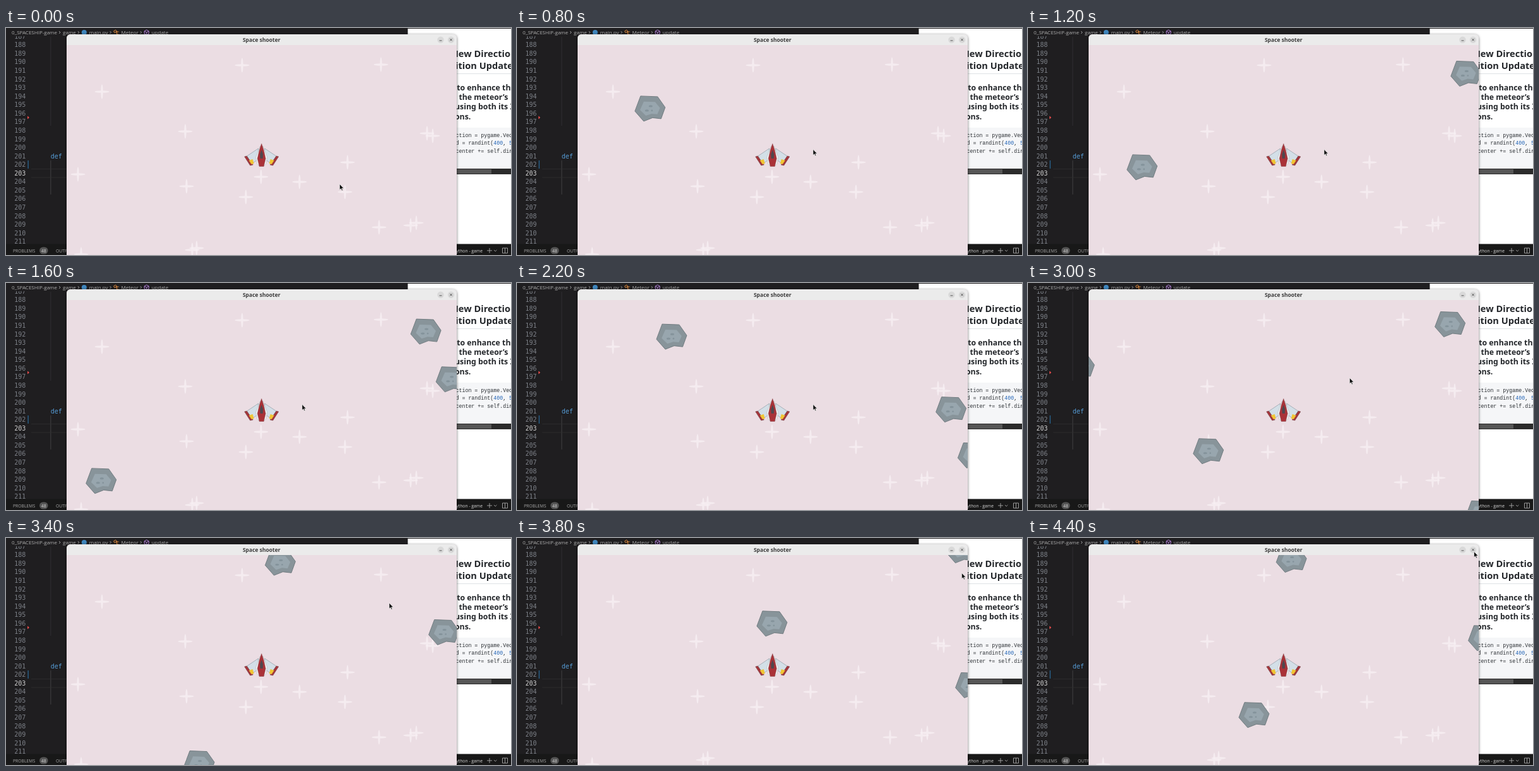
Write an HTML page that moves like this. It is 800 px wide and 360 px high and loops after 4600 ms.

```html
<!DOCTYPE html>
<html lang="en">
<head>
<meta charset="utf-8">
<title>Space shooter</title>
<style>
html, body { margin: 0; width: 100%; height: 100%; overflow: hidden; background: #1f1e20; }
svg { display: block; width: 800px; height: 360px; }
text { white-space: pre; }
.mono { font: 10px "DejaVu Sans Mono", monospace; fill: #7d8188; }
.active { fill: #d0d0d0; }
.keyword { fill: #569cd6; }
.crumb { font: 8px "Open Sans", sans-serif; fill: #adadad; }
.panel { font: 6.8px "Open Sans", sans-serif; fill: #a8a8a8; }
.light { fill: #d6d6d6; }
.heading { font: bold 14.6px "Noto Sans", sans-serif; fill: #25282c; }
.para { font: bold 12.3px "Noto Sans", sans-serif; fill: #25282c; }
.code { font: 8.3px "Liberation Mono", monospace; fill: #2b2f33; }
.number { fill: #1f62b5; }
.title { font: bold 8.5px "Noto Sans", sans-serif; fill: #3c3c3c; text-anchor: middle; }
.line { fill: none; stroke: #aaa; stroke-width: .9; }
.window { fill: #ebdde3; filter: drop-shadow(0 1px 2px rgba(0, 0, 0, .55)); }
</style>
</head>
<body>
<svg viewBox="0 0 800 360">
  <defs>
    <clipPath id="view"><rect x="96" y="27" width="618" height="333"/></clipPath>
    <g id="star" fill="#f8f0f4" opacity=".8">
      <ellipse rx="11.500" ry="1.700"/><ellipse rx="1.700" ry="11.500"/>
    </g>
    <path id="rock" d="M-15-20L12-19 24-2 17.500 16 4 14.500-10 20-24 4Z"/>
    <g id="meteor">
      <use href="#rock" fill="#88949a" stroke="#6b767b" stroke-width=".9"/>
      <use href="#rock" fill="#98a6ae" transform="scale(.66 .56)"/>
      <g fill="#84939b">
        <ellipse cx="-5" cy="3" rx="3" ry="1.600"/><ellipse cx="1" cy="-4" rx="3" ry="1.600"/><circle cx="3" cy="3" r="1.300"/>
      </g>
    </g>
    <g id="wing">
      <path d="M-5-11L-23 1-16 14-8 8-4 12Z" fill="#d3dfe7" stroke="#929da5" stroke-width=".7"/>
      <path d="M-27 2L-23.500 1-13.500 15-18 16Z" fill="#a5343a" stroke="#6f4548" stroke-width=".6"/>
      <path d="M-20 8L-14 6-12 13-16 14Z" fill="#f0c534"/>
      <path d="M-2-15L-9 3-7 14-3 17Z" fill="#f4f4f5" stroke="#a9aeb3" stroke-width=".5"/>
    </g>
  </defs>

  <rect width="800" height="360" fill="#1f1e20"/>
  <g id="editor"></g>

  <rect y="342.500" width="800" height="18" fill="#181818"/>
  <g id="panel">
    <rect x="53" y="347.500" width="13.500" height="11" rx="5.500" fill="#555"/>
    <path class="line" d="M762 353h8M766 349v8M773 352l2.200 2.200 2.200-2.200M786.500 349h8v8h-8zM790.500 349v8"/>
  </g>

  <rect x="636.500" y="1" width="164" height="341.500" fill="#fff"/>
  <rect x="700" y="72" width="100" height="1" fill="#dfe2e5"/>
  <rect x="700" y="158" width="100" height="65" fill="#f5f6f8"/>
  <rect x="700" y="223" width="100" height="9" fill="#2b2b2b"/>
  <rect x="700" y="224" width="69" height="7" fill="#565656"/>
  <g id="page"></g>

  <path class="window" d="M96 364V17q0-7 7-7H707q7 0 7 7V364Z"/>
  <path d="M96 27V17q0-7 7-7H707q7 0 7 7V27Z" fill="#ebebeb"/>
  <g fill="#d9d9d9"><circle cx="688.500" cy="18.700" r="5.200"/><circle cx="705" cy="18.700" r="5.200"/></g>
  <path d="M686.500 20h4M703.200 16.900l3.600 3.600M706.800 16.900l-3.600 3.600" stroke="#444" stroke-width=".9"/>
  <text class="title" x="404.800" y="21.700">Space shooter</text>

  <g clip-path="url(#view)">
    <g id="stars"></g>
    <g transform="translate(404.800 202)">
      <use href="#wing"/><use href="#wing" transform="scale(-1 1)"/>
      <path d="M0-18.500L3.500-8 6.500 5 3.500 17.500H-3.500L-6.500 5-3.500-8Z" fill="#a93238" stroke="#84454a" stroke-width=".5"/>
      <path d="M0-9L2.500-2 2 5H-2L-2.500-2Z" fill="#51474e"/>
    </g>
    <g id="meteors"></g>
  </g>
  <path id="cursor" d="M0 0V9.200L2.100 7.300 3.600 10.500 5 9.800 3.600 6.800H6.500Z" fill="#111" stroke="#fff" stroke-width=".6"/>
</svg>

<script>
const STEP = 200, LOOP = 4600;
const $ = id => document.getElementById(id);

function add(parent, tag, attrs, content = "") {
  const el = document.createElementNS("http://www.w3.org/2000/svg", tag);
  for (const name in attrs) el.setAttribute(name, attrs[name]);
  el.textContent = content;
  return $(parent).appendChild(el);
}
const label = (parent, cls, x, y, content) => add(parent, "text", { class: cls, x, y }, content);
const rect = (parent, x, y, width, height, fill) => add(parent, "rect", { x, y, width, height, fill });
const lines = (parent, cls, x, y, pitch, list) =>
  list.forEach((content, i) => label(parent, cls, x, y + i * pitch, content));

// Editor
for (let n = 187; n <= 211; n++)
  label("editor", n === 203 ? "mono active" : "mono", 13.3, 30.3 + (n - 188) * 13.565, n);
rect("editor", 0, 0, 96, 13, "#1f1e20");
rect("editor", 70.5, 14, 0.8, 141, "#353436");
rect("editor", 70.5, 210, 0.8, 54, "#4a4a4a");
rect("editor", 40, 223.3, 56, 0.8, "#303030");
rect("editor", 40, 236.6, 56, 0.8, "#303030");
rect("editor", 34.5, 210, 1.2, 13, "#2a6b9c");
add("editor", "path", { d: "M34 139.5l3 2.5-3 2.5z", fill: "#e34b4b" });
label("editor", "mono keyword", 70.8, 206.7, "def update");

// Breadcrumb: each part follows the width of the one before
const icons = {
  "main.py": { d: "M-4 0a4 4 0 1 0 8 0a4 4 0 1 0-8 0", fill: "#3f86bd" },
  Meteor: { d: "M-4-2l3-2 2 2-3 3zM-1-1h5M1-1v4h3", fill: "none", stroke: "#e28b3d" },
  update: { d: "M0-4l3.5 2v4l-3.5 2-3.5-2v-4zM-3.5-2l3.5 2 3.5-2M0 0v4", fill: "none", stroke: "#b180d7" }
};
let x = 9;
for (const name of ["0_SPACESHIP-game", "game", ...Object.keys(icons)]) {
  if (x > 9) {
    add("editor", "path", { class: "line", d: `M${x + 3} 5l2 2-2 2` });
    x += 9;
  }
  if (icons[name]) {
    add("editor", "path", { ...icons[name], transform: `translate(${x + 4} 7)` });
    x += 12;
  }
  x += label("editor", "crumb", x, 9.8, name).getComputedTextLength();
}

// Panel and page
label("panel", "panel", 11, 355.7, "PROBLEMS");
label("panel", "panel light", 55.8, 355.7, "48");
label("panel", "panel", 79, 355.7, "OUTPUT");
label("panel", "panel light", 755, 355.7, "python - game").setAttribute("text-anchor", "end");
label("page", "heading", 705, 46.3, "New Direction");
label("page", "heading", 712, 64.8, "ition Update");
lines("page", "para", 711, 98.6, 15.4, [" to enhance the", "  the meteor’s", "using both its X", "ons."]);
lines("page", "code", 707.5, 173, 12.3, [" ction = pygame.Vector2", " d = randint(   ,    )", ".center += self.direction"]);
label("page", "code number", 707.5, 185.3, " ".repeat(13) + "400  500");

const stars = [[374, 59], [594, 58], [152, 101], [284, 164], [667, 167], [676, 171], [541, 213],
  [114, 232], [404, 236], [465, 244], [286, 251], [537, 260], [380, 268], [591, 316],
  [641, 313], [650, 309], [302, 349], [295, 352], [119, 359]];
for (const [x, y] of stars) add("stars", "use", { href: "#star", x, y });

// A meteor spawns every 2.5 steps: x, y, drift and fall per step
const FIRST_SPAWN = 1.25, SPAWN_EVERY = 2.5;
const meteors = [
  [252, 0, -15, 46.5], [681, -18, 5.7, 40.2], [652, 5, 7.5, 41.2],
  [222, -17, 10.2, 45.4], [112, -18, -8.2, 40], [653, 13, 12.5, 42],
  [446, 3, -15.3, 48.3], [703, 8, 5.7, 46.4], [421, 0, -5, 46]
].map(path => ({ path, el: add("meteors", "use", { href: "#meteor" }) }));

// Cursor: step, x, y; straight moves between
const cursorPath = [[0, 528.5, 247.5], [1, 469, 192.5], [13, 469, 192.5], [15, 509.5, 150.5], [19, 704.5, 55.5], [22, 706.5, 21.5]];

function cursorAt(step) {
  const i = Math.max(1, cursorPath.findIndex(p => p[0] >= step));
  const [k0, x0, y0] = cursorPath[i - 1], [k1, x1, y1] = cursorPath[i];
  const f = (step - k0) / (k1 - k0);
  return [x0 + (x1 - x0) * f, y0 + (y1 - y0) * f];
}

const place = (el, x, y) => el.setAttribute("transform", `translate(${x} ${y})`);

const start = performance.now();
function draw(now) {
  const step = Math.floor(Math.max(0, now - start) % LOOP / STEP);
  meteors.forEach(({ path: [x, y, drift, fall], el }, i) => {
    const age = step - FIRST_SPAWN - i * SPAWN_EVERY;
    place(el, x + age * drift, y + age * fall);
  });
  place($("cursor"), ...cursorAt(step));
  requestAnimationFrame(draw);
}
draw(start);
</script>
</body>
</html>
```
